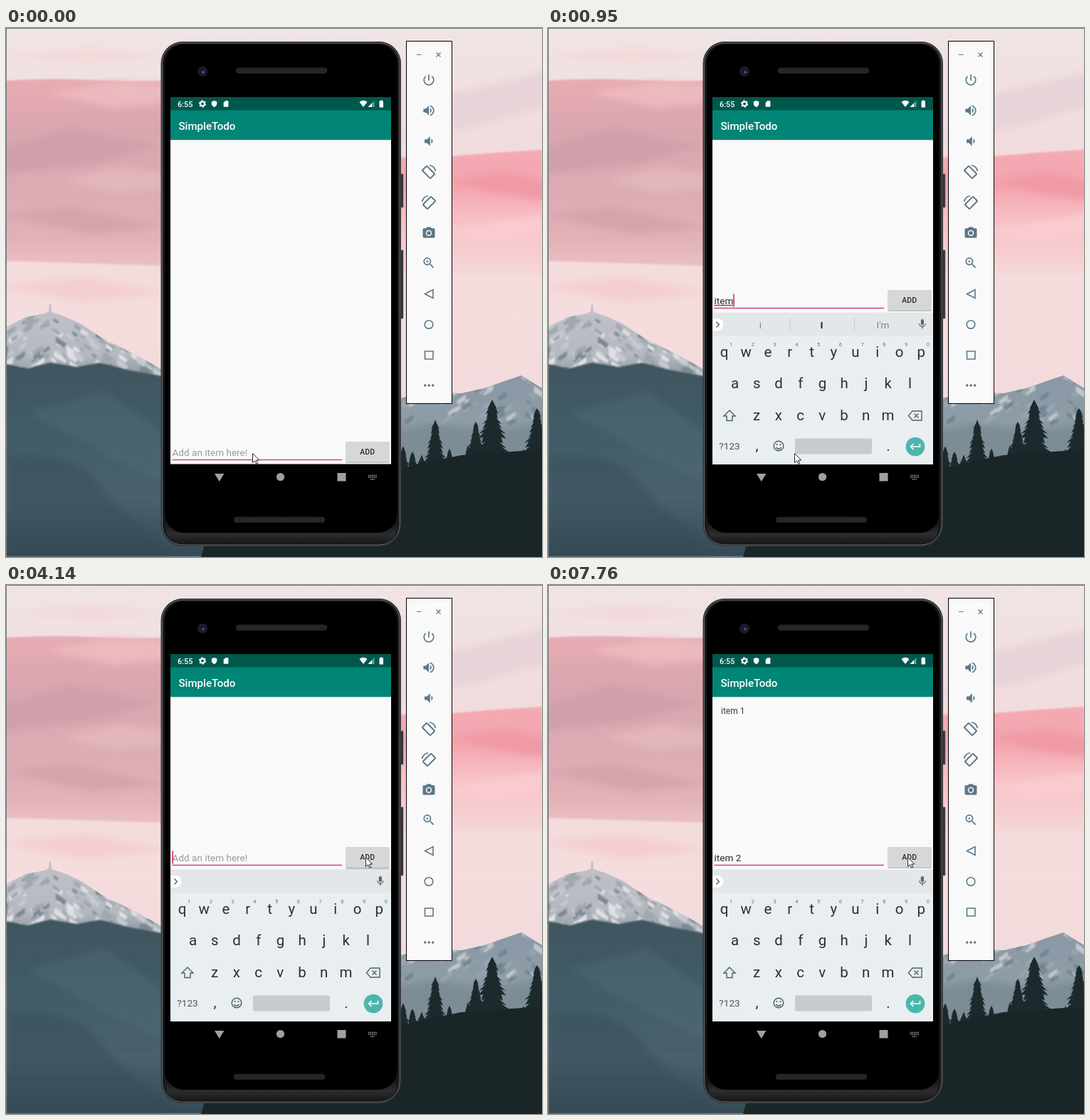
Animation of 753 by 743 pixels, one loop 8000 ms. Source, as an HTML page:

```html
<!DOCTYPE html>
<html lang="en">
<head>
<meta charset="utf-8">
<title>Todo app demo</title>
<style>
  html, body { margin: 0; width: 100%; height: 100%; overflow: hidden; }
  svg { display: block; width: 753px; height: 743px; }
  text { font-family: Roboto, sans-serif; white-space: pre; }
  .mid { text-anchor: middle; }
  .key { font-size: 20.5px; fill: #263238; }
  .alt { font-size: 7.5px; fill: #66757c; }
  .field { font-size: 13.57px; }
  .word { font-size: 13.6px; }
  .thin { fill: none; stroke: #4d6069; stroke-width: 1.4; }
  .tool { fill: #5b7887; }
  .tool-line { fill: none; stroke: #5b7887; stroke-width: 1.6; }
</style>
</head>
<body>
<svg viewBox="0 0 753 743">
  <defs>
    <linearGradient id="sky" x2="0" y2="1">
      <stop offset="0" stop-color="#f0e4e4"/>
      <stop offset=".3" stop-color="#f2d9da"/>
      <stop offset=".55" stop-color="#f5dcdd"/>
      <stop offset="1" stop-color="#eed9dc"/>
    </linearGradient>
    <linearGradient id="dusk" x2="0" y2="1">
      <stop offset="0" stop-color="#e8abb3"/>
      <stop offset=".28" stop-color="#d9a6af"/>
      <stop offset=".55" stop-color="#dbaab2"/>
      <stop offset=".85" stop-color="#e2b0b7"/>
      <stop offset="1" stop-color="#e9c0c4"/>
    </linearGradient>
    <linearGradient id="glow" x2="0" y2="1">
      <stop offset="0" stop-color="#f4aab3"/>
      <stop offset=".3" stop-color="#f3a5ae"/>
      <stop offset=".55" stop-color="#f7bec4"/>
      <stop offset="1" stop-color="#f5d6d8"/>
    </linearGradient>
    <linearGradient id="hill" x2="0" y2="1">
      <stop offset="0" stop-color="#40565f"/>
      <stop offset=".35" stop-color="#425c67"/>
      <stop offset=".7" stop-color="#49626d"/>
      <stop offset="1" stop-color="#344b55"/>
    </linearGradient>
    <linearGradient id="ridge" x2="0" y2="1">
      <stop offset="0" stop-color="#8998a5"/>
      <stop offset=".45" stop-color="#8d9ca6"/>
      <stop offset="1" stop-color="#5d7179"/>
    </linearGradient>
    <linearGradient id="snow" x2="0" y2="1">
      <stop offset="0" stop-color="#c3c3ca"/>
      <stop offset=".6" stop-color="#b4b8bf"/>
      <stop offset="1" stop-color="#6d7d87"/>
    </linearGradient>
    <linearGradient id="chin" x2="0" y2="1">
      <stop offset="0" stop-color="#0c0c0d"/>
      <stop offset=".6" stop-color="#2c2d2f"/>
      <stop offset="1" stop-color="#151617"/>
    </linearGradient>
    <filter id="soft" x="-20%" y="-50%" width="140%" height="200%"><feGaussianBlur stdDeviation="5"/></filter>
    <filter id="edge"><feGaussianBlur stdDeviation="1"/></filter>
    <pattern id="mesh" width="3" height="3" patternUnits="userSpaceOnUse">
      <rect width="3" height="3" fill="#2b2b2b"/><rect width="1.5" height="1.5" fill="#171717"/>
    </pattern>
    <clipPath id="peak"><path d="M0 420 28 406 54 401 60 398 61 388 63 388 64 399 82 405 104 415 136 436 180 458 220 480V510L0 490Z"/></clipPath>
    <clipPath id="range"><path d="M545 522 590 512 640 513 672 506 700 496 724 488 753 506V640H545Z"/></clipPath>
    <clipPath id="screen"><path d="M231 97H541V643H231Z"/></clipPath>
  </defs>

  <!-- landscape -->
  <rect width="753" height="743" fill="url(#sky)"/>
  <path d="M0 74Q60 70 120 73T225 74V334L0 327Z" fill="url(#dusk)" filter="url(#edge)"/>
  <path d="M548 182 627 180 690 175 753 171V345H548Z" fill="url(#glow)" filter="url(#edge)"/>
  <g filter="url(#soft)">
    <path d="M-9 40 120 28 230 40 120 50Z" fill="#f3d9da"/>
    <path d="M-9 168 90 140 215 165 130 190 0 205Z" fill="#cfa0ac"/>
    <path d="M60 92 150 74 230 80V104L150 112Z" fill="#ecb9be"/>
    <path d="M80 214 160 196 230 206V226L150 232Z" fill="#e2b6bb"/>
    <path d="M-9 262 90 250 225 280 120 290Z" fill="#d4a4ad"/>
    <path d="M-9 362 110 350 225 372 110 385Z" fill="#f3cfd1"/>
    <path d="M627 92 760 60V110L660 140 548 155Z" fill="#e8d4d8"/>
    <path d="M620 214 700 202 760 215V242L690 232Z" fill="#f09aa5"/>
    <path d="M600 285 760 262V290L680 305Z" fill="#f9cbcf"/>
  </g>
  <g clip-path="url(#peak)"><rect y="385" width="220" height="125" fill="url(#snow)"/><g id="snowfield" filter="url(#edge)"></g></g>
  <path d="M0 472 30 478 62 470 100 476 132 470 170 480 225 490V600H300V743H0Z" fill="url(#hill)" filter="url(#edge)"/>
  <path d="M0 600Q90 590 130 640T225 720V743H0Z" fill="#354c56" opacity=".45" filter="url(#soft)"/>
  <path d="M30 540 140 510 222 570V640L140 600Z" fill="#56707a" opacity=".35" filter="url(#soft)"/>
  <g clip-path="url(#range)"><rect x="545" y="485" width="210" height="150" fill="url(#ridge)"/><g id="foothills" filter="url(#edge)"></g></g>
  <path d="M545 570 600 555 680 570 753 555V620H545Z" fill="#7c8d96" filter="url(#soft)"/>
  <g id="trees" fill="#1c292d"></g>
  <path d="M545 622 580 612 640 600 753 592V743H545Z" fill="#1a2528"/>
  <path d="M274 743 280 722 285 706 291 722 300 716H560V743Z" fill="#1a2528"/>
  <path d="M0 .5H753M.5 0V743" stroke="#77787a"/>

  <!-- phone -->
  <path d="M553 205H558V252H553ZM553 312H558V408H553Z" fill="#303235" stroke="#6c6f73" stroke-width=".7"/>
  <rect x="218" y="19.5" width="336.500" height="708" rx="30" fill="#17181a" stroke="#3c3e41"/>
  <rect x="219.500" y="21" width="333.500" height="705" rx="28.500" fill="none" stroke="#6d7074"/>
  <path d="M224 690H549V698Q549 725 521 725H252Q224 725 224 698Z" fill="url(#chin)"/>
  <rect x="223" y="23" width="326.500" height="686" rx="27" fill="#000"/>
  <rect x="323" y="56" width="128" height="7.500" rx="3.700" fill="url(#mesh)" stroke="#202020"/>
  <rect x="320" y="687" width="128" height="7.500" rx="3.700" fill="url(#mesh)" stroke="#202020"/>
  <circle cx="276" cy="61" r="7" fill="#1c1d22"/><circle cx="276" cy="61" r="4" fill="#14183c"/>
  <circle cx="277" cy="62" r="1.700" fill="#4a5ca8"/>

  <!-- app -->
  <g clip-path="url(#screen)">
    <path d="M231 157H541V643H231Z" fill="#f9f9f9"/>
    <path id="navbar" d="M231 612.500H541V643H231Z"/>
    <path d="M231 115H541V157H231Z" fill="#008577"/>
    <path d="M231 97H541V115.500H231Z" fill="#00574b"/>
    <path d="M231 157.500H541" stroke="#c9d6d3"/>
    <text x="241" y="110.500" font-size="10.900" font-weight="500" fill="#fff">6:55</text>
    <g fill="#fff">
      <circle cx="276" cy="106.500" r="2.900" fill="none" stroke="#fff" stroke-width="2"/>
      <circle cx="276" cy="106.500" r="4.400" fill="none" stroke="#fff" stroke-width="1.500" stroke-dasharray="2.300"/>
      <path transform="translate(287.500 101.500) scale(.42)" d="M12 1L3 5v6c0 5.550 3.840 10.740 9 12 5.160-1.260 9-6.450 9-12V5z"/>
      <path transform="translate(304 101.500) scale(.42)" d="M18 2h-8L4 8v12c0 1.100.9 2 2 2h12c1.100 0 2-.9 2-2V4c0-1.100-.9-2-2-2z"/>
      <path d="M496.500 104Q502 99.500 507.500 104L502 111Z"/>
      <path d="M517.500 102V111H508.500Z" opacity=".4"/><path d="M514 105.500V111H508.500Z"/>
      <path d="M524.500 102.500H526V101.500H528.500V102.500H530V111.500H524.500Z"/>
    </g>
    <text x="242.500" y="142.500" font-size="15.100" font-weight="500" fill="#fff">SimpleTodo</text>
    <text id="item" x="243" y="180.500" font-size="12" fill="#3c3c3c">item 1</text>

    <g id="form">
      <path d="M233.500 393.500H472" stroke="#d2477c" stroke-width="1.300"/>
      <text id="entry" class="field" x="233.500" y="388"></text>
      <path id="compose" stroke="#333" stroke-width="1"/>
      <path id="caret" d="M0 373.500V391.500" stroke="#d81b60" stroke-width="1.500"/>
      <rect id="shade" x="477.500" y="369" width="61" height="29" rx="1.500" fill="#bfc1c1"/>
      <rect id="button" x="477" y="368" width="61.500" height="28.500" rx="1.500"/>
      <text class="mid" x="507.700" y="385.500" font-size="10.560" font-weight="500" fill="#2b2b2b">ADD</text>
    </g>

    <g id="keyboard">
      <path d="M231 432H541V613H231Z" fill="#e9eef1"/>
      <path d="M231 399.500H541V432.500H231Z" fill="#e3e7ea"/>
      <path id="bars" d="M340 407V426M430.500 407V426" stroke="#c6cbce"/>
      <g id="words"></g>
      <path d="M231 408H238A8.200 8.200 0 0 1 238 425H231Z" fill="#fff"/>
      <path d="M236.500 412.500 240.300 416.500 236.500 420.500" class="thin"/>
      <path transform="translate(517.500 407.500) scale(.7)" fill="#5b696f" d="M12 14c1.660 0 3-1.340 3-3V5c0-1.660-1.340-3-3-3S9 3.340 9 5v6c0 1.660 1.340 3 3 3zm5.300-3c0 3-2.540 5.100-5.300 5.100S6.700 14 6.700 11H5c0 3.410 2.720 6.230 6 6.720V21h2v-3.280c3.280-.48 6-3.300 6-6.720z"/>
      <g id="keys"></g>
      <path d="M255 537 263 545H259V551.500H251V545H247Z" class="thin"/>
      <path d="M506.500 544.500 512 538H525V551H512ZM514.500 541.500 520.500 547.500M520.500 541.500 514.500 547.500" class="thin"/>
      <text class="mid" x="255" y="592" font-size="13.600" fill="#45555d">?123</text>
      <circle cx="324" cy="587" r="6.800" class="thin"/>
      <path d="M320.500 589Q324 593.500 327.500 589" class="thin"/>
      <circle cx="321.500" cy="585" r="1.100" fill="#4d6069"/><circle cx="326.500" cy="585" r="1.100" fill="#4d6069"/>
      <rect x="347" y="576.500" width="108" height="22" rx="2" fill="#c7cbce"/>
      <circle cx="516" cy="588" r="13.300" fill="#4db6ac"/>
      <path d="M522.500 584V588H510M513.500 584 509.500 588 513.500 592" fill="none" stroke="#fff" stroke-width="1.600"/>
    </g>
    <g id="toast">
      <rect x="331" y="559" width="110" height="35.500" rx="17.500" fill="#eceff1" opacity=".55"/>
      <text id="notice" x="348.500" y="580" font-size="10.560" fill="#444">Item was added</text>
    </g>
    <path id="veil" d="M231 612.500H541V643H231Z" opacity=".4"/>
  </g>

  <g id="nav">
    <path d="M293 626H306.500L299.700 637Z"/><circle cx="385.500" cy="630.500" r="5.600"/>
    <path d="M465.500 625H477.500V636.500H465.500Z"/>
    <path d="M509 628.500H521M509 631H521M512 634H518" stroke="#a0a0a0" stroke-width="1.300" stroke-dasharray="1.600 .9"/>
  </g>

  <!-- emulator toolbar -->
  <rect x="562.500" y="18.500" width="64" height="509" fill="#f9f9f9" stroke="#000"/>
  <path d="M577 37.500H583.500M604.500 34.500 610.500 40.500M610.500 34.500 604.500 40.500" class="tool-line" style="stroke-width:1.100"/>
  <g id="tools" class="tool"></g>
  <path d="M600 367.500V379.500L588.500 373.500Z" class="tool-line"/>
  <circle cx="594" cy="416.500" r="5.800" class="tool-line"/>
  <path d="M588.500 454H600V465H588.500Z" class="tool-line"/>
  <g class="tool"><circle cx="588.700" cy="502" r="1.800"/><circle cx="594.200" cy="502" r="1.800"/><circle cx="599.700" cy="502" r="1.800"/></g>

  <path id="pointer" d="M.5.5V13.500L3.600 10.700 5.700 15.400 7.700 14.500 5.700 10H9.800Z" fill="#fff" stroke="#111" stroke-width=".9"/>
</svg>

<script>
const $ = id => document.getElementById(id);
const LOOP = 8000;

let seed = 7;
const rand = () => (seed = seed * 16807 % 2147483647) / 2147483647;

// scenery
function fir(x, top, bottom, width) {
  const left = [], right = [], tiers = Math.round((bottom - top) / 7);
  for (let i = 1; i <= tiers; i++) {
    const y = top + (bottom - top) * i / tiers;
    const w = width * (i / tiers) ** .7 * (.75 + rand() * .5);
    left.unshift(`${x - w * .65} ${y - 2}`, `${x - w} ${y}`);
    right.push(`${x + w} ${y}`, `${x + w * .65} ${y - 2}`);
  }
  return `<path d="M${[`${x} ${top}`, ...right, ...left].join('L')}Z"/>`;
}
let forest = fir(603, 550, 645, 20) + fir(683, 522, 645, 30) + fir(746, 534, 645, 26) + fir(660, 553, 640, 19);
for (let x = 558; x < 760; x += 13) forest += fir(x, 580 + rand() * 22, 655, 14);
$('trees').innerHTML = forest;

// rock and snow blotches running down a slope on both sides of a summit
function blotches(count, x0, width, y0, height, summit, tones) {
  let out = '';
  for (let i = 0; i < count; i++) {
    const x = x0 + rand() * width, y = y0 + rand() * height;
    const len = 5 + rand() * 11, dx = (x < summit ? -1 : 1) * len;
    out += `<path d="M${x} ${y}l${dx} ${len * .7}l${-dx * .2} ${len * .4}l${-dx * .8} ${-len * .5}z" fill="${tones[i % tones.length]}"/>`;
  }
  return out;
}
$('snowfield').innerHTML = blotches(170, 0, 220, 396, 92, 62, ['#7d8993', '#a0a7b0', '#e0dfe4', '#c6c9d0']);
$('foothills').innerHTML = blotches(80, 545, 210, 488, 60, 724, ['#728592', '#98a6b0', '#c3c6ce']);

const label = (cls, x, y, s, extra = '') => `<text class="mid ${cls}" x="${x}" y="${y}" ${extra}>${s}</text>`;
const row = (letters, x, y) => [...letters].map((c, i) => label('key', x + 30.75 * i, y, c)).join('');
$('keys').innerHTML = row('qwertyuiop', 247.5, 461.5) + row('asdfghjkl', 262.5, 506) + row('zxcvbnm', 293, 550.5)
  + label('key', 293.5, 593, ',') + label('key', 478, 594, '.')
  + [...'1234567890'].map((d, i) => label('alt', 257 + 30.75 * i, 446.5, d)).join('');

const icon = (y, d) => `<path transform="translate(594 ${y}) scale(.85) translate(-12 -12)" fill-rule="evenodd" d="${d}"/>`;
const rotateIcon = (y, flip) => `<g class="tool-line" transform="translate(594 ${y}) scale(${flip} 1)">
  <rect x="-4.500" y="-8" width="9" height="16" rx="1" transform="translate(-.5 .5) rotate(-45)" stroke-width="2"/>
  <path d="M1 -9.300A9.300 9.300 0 0 1 9.300 -1"/></g>`;
$('tools').innerHTML =
  icon(73, 'M13 3h-2v10h2zm4.830 2.170l-1.420 1.420A6.920 6.920 0 0 1 19 12a7 7 0 1 1-11.420-5.420L6.170 5.170A8.930 8.930 0 0 0 3 12a9 9 0 0 0 18 0c0-2.740-1.230-5.180-3.170-6.830z')
  + icon(116, 'M3 9v6h4l5 5V4L7 9zm13.500 3c0-1.770-1.020-3.290-2.500-4.030v8.050c1.480-.73 2.500-2.250 2.500-4.020zM14 3.230v2.060c2.890.86 5 3.540 5 6.710s-2.110 5.850-5 6.710v2.060c4.010-.91 7-4.490 7-8.770s-2.990-7.860-7-8.770z')
  + icon(159, 'M18.500 12c0-1.770-1.020-3.290-2.500-4.030v8.050c1.480-.73 2.500-2.250 2.500-4.020zM5 9v6h4l5 5V4L9 9z')
  + rotateIcon(202, 1) + rotateIcon(245, -1)
  + icon(288, 'M9 2L7.170 4H4a2 2 0 0 0-2 2v12a2 2 0 0 0 2 2h16a2 2 0 0 0 2-2V6a2 2 0 0 0-2-2h-3.170L15 2zm3 15a5 5 0 1 1 0-10 5 5 0 0 1 0 10zm0-1.800a3.200 3.200 0 1 0 0-6.400 3.200 3.200 0 0 0 0 6.400z')
  + icon(330, 'M15.500 14h-.79l-.28-.27A6.470 6.470 0 0 0 16 9.500 6.500 6.500 0 1 0 9.500 16c1.610 0 3.090-.59 4.230-1.570l.27.28v.79l5 4.990L20.490 19zm-6 0a4.500 4.500 0 1 1 0-9 4.500 4.500 0 0 1 0 9zM12 10h-2v2H9v-2H7V9h2V7h1v2h2z');

// step tracks: [start time, value]
const typed = [[0, ''], [670, 'i'], [800, 'it'], [950, 'item'], [1780, 'item '], [1930, 'item 1'], [4140, ''],
  [5390, 'i'], [5540, 'it'], [5690, 'ite'], [5820, 'item'], [6120, 'item '], [6400, 'item 2']];
const blink = [[0, 0], [120, 1], [1500, 0], [1780, 1], [2600, 0], [3000, 1], [4720, 0], [5260, 1], [6810, 0], [7360, 1], [7760, 0]];
const hints = [[0, 'thanks,I,we'], [800, "i,I,I'm"], [1070, 'items,item,itemized'], [1780, 'in,is,and'], [2050, '']];
const pointer = [[0, [346, 597]], [2450, [430, 434]], [2600, [460, 424]], [2720, [483, 407]], [2850, [499, 388]], [3000, [505, 382]]];
const toast = [[0, 0], [4720, .25], [4850, .55], [4990, .8], [5120, .95], [6120, .95], [6250, .75], [6400, 0]];
const item = [[0, 0], [4720, .5], [4850, 1]];

const pick = (track, t) => track.findLast(([start]) => start <= t)[1];
const attr = (id, name, value) => $(id).setAttribute(name, value);
const show = (id, on) => attr(id, 'visibility', on ? 'inherit' : 'hidden');

let shownHints;
function drawHints(list, t) {
  const key = list + (t >= 800);
  if (key === shownHints) return;
  shownHints = key;
  show('bars', list);
  $('words').innerHTML = list && list.split(',').map((w, i) => {
    const strong = i === 1 && t >= 800;
    return label('word', [298.5, 384.5, 470.5][i], 421.5, w, strong ? 'font-weight="700" fill="#1d282d"' : 'fill="#77848a"');
  }).join('');
}

function draw(t) {
  const text = pick(typed, t), entry = $('entry');
  const rising = t >= 380 && t < 520, pressed = t >= 3710 && t < 4140;

  attr('form', 'transform', `translate(0 ${t < 120 ? 213 : 0})`);
  entry.textContent = text || 'Add an item here!';
  entry.setAttribute('fill', text ? '#2b2b2b' : '#9b9b9b');
  const end = 233.5 + (text ? entry.getComputedTextLength() : 0);
  attr('caret', 'transform', `translate(${end + .7} 0)`);
  show('caret', pick(blink, t));
  attr('compose', 'd', `M233.500 389.500H${end}`);
  show('compose', /^\w+$/.test(text));
  attr('button', 'fill', pressed ? '#c3c5c5' : '#d6d7d7');
  attr('shade', 'height', t >= 3710 && t < 4570 ? 30.5 : 29);

  show('keyboard', t >= 380);
  attr('keyboard', 'transform', `translate(0 ${rising ? 31 : 0})`);
  attr('keyboard', 'opacity', rising ? .72 : 1);
  show('veil', rising);
  show('navbar', !rising);
  attr('nav', 'fill', rising ? '#dedede' : '#a0a0a0');
  drawHints(pick(hints, t), t);

  attr('item', 'opacity', pick(item, t));
  attr('toast', 'opacity', pick(toast, t));
  attr('pointer', 'transform', `translate(${pick(pointer, t)})`);
}

function frame() {
  draw(performance.now() % LOOP);
  requestAnimationFrame(frame);
}
frame();
</script>
</body>
</html>
```
